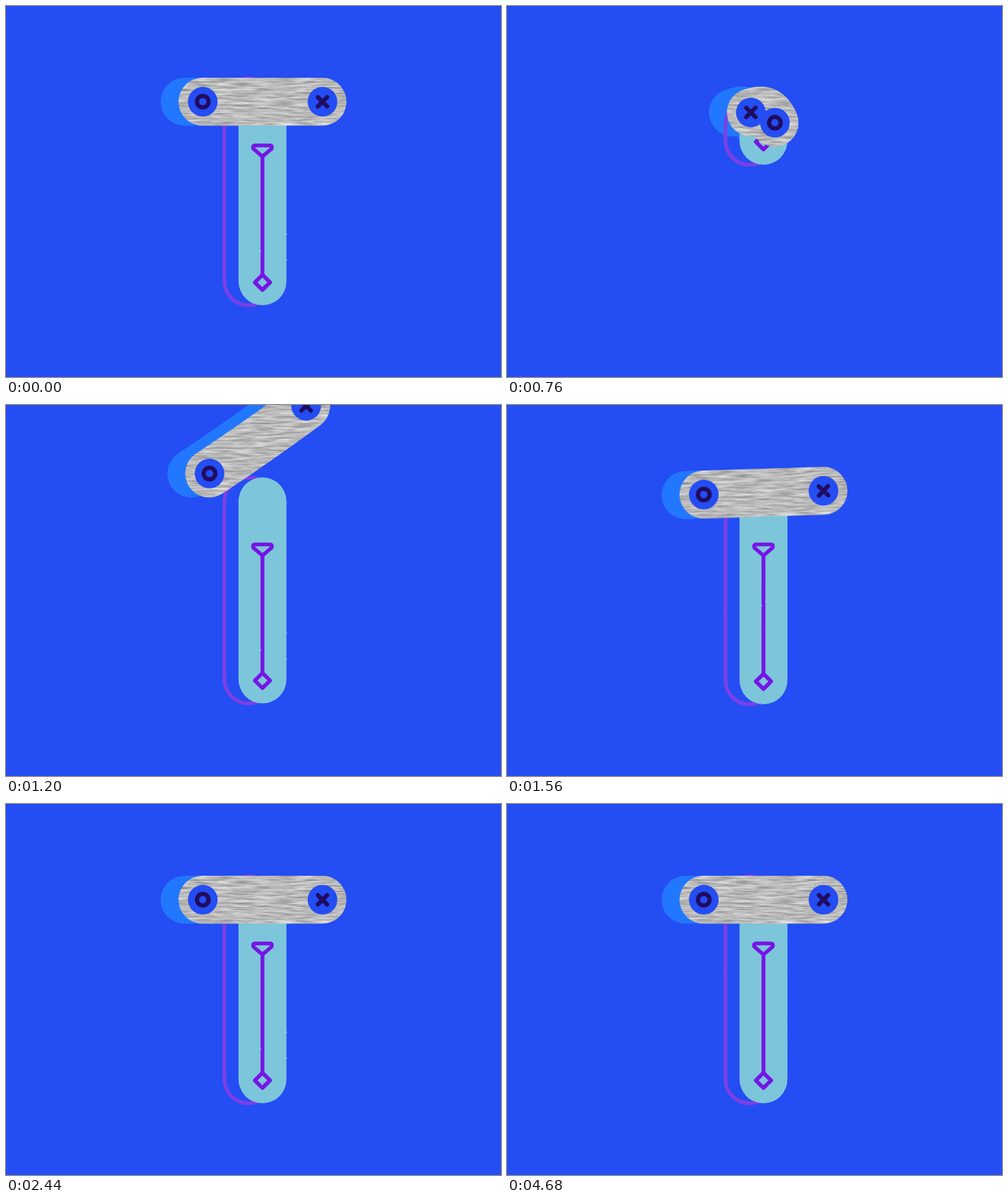
An HTML page without scripts for the animation above (4840 ms loop, 800 px wide and 600 px high).

```html
<!DOCTYPE html>
<html lang="en">
<head>
<meta charset="utf-8">
<title>Letter T</title>
<style>
  @property --top { syntax: "<number>"; inherits: true; initial-value: 117; }
  @property --bottom { syntax: "<number>"; inherits: true; initial-value: 484; }

  :root {
    --loop: 4.84s infinite;
    --wind-up: cubic-bezier(.6, -.28, .74, .05);
    --overshoot: cubic-bezier(.3, 1.3, .6, 1);
  }
  html, body { margin: 0; width: 100%; height: 100%; overflow: hidden; background: #244df3; }
  svg { display: block; width: 100vw; height: 100vh; }

  /* every part of the stem follows its two ends */
  .stem { animation: stem var(--loop) linear; }
  .capsule {
    y: calc(var(--top) * 1px);
    height: calc((var(--bottom) - var(--top)) * 1px);
  }
  .outline { fill: none; stroke: #7b40e6; stroke-width: 6; }
  .column { fill: #7cc5da; }
  .rod { fill: #7615e6; height: max(0px, (var(--bottom) - 294) * 1px); }
  .ink { fill: none; stroke: #7615e6; stroke-width: 6.2; stroke-linejoin: round; }
  .funnel {
    transform-origin: 414.5px 234px;
    transform: scale(clamp(0, (var(--bottom) - 274) / 40, 1));
  }
  .diamond { transform: translate(414.5px, calc((var(--bottom) - 37) * 1px)); }

  .hop {
    transform-origin: 414.5px 155px;
    animation: hop var(--loop) ease-out, vanish var(--loop) step-end;
  }
  .bar {
    fill: none;
    stroke-width: 77.5;
    stroke-linecap: round;
    animation: bar var(--loop) linear;
  }
  .shade { stroke: #2277ff; }
  .wood { stroke: #bdbdbd; filter: url(#wood); }
  .buttons { marker-start: url(#ring); marker-end: url(#cross); }
  .button { fill: #244df3; }
  .mark { fill: none; stroke: #200c60; stroke-width: 6.8; stroke-linecap: round; }

  /* collapse to a disc, then spring back */
  @keyframes stem {
    0%, 4%, 25.6%, 100% { --top: 117; --bottom: 484; animation-timing-function: var(--wind-up); }
    10.7%, 14% { --top: 159.75; --bottom: 237.25; animation-timing-function: ease-in; }
    19%, 19.8% { --top: 118; --bottom: 355; animation-timing-function: var(--overshoot); }
  }

  /* arch, fold away, then a half turn through the air */
  @keyframes bar {
    0%, 4%, 29%, 100% { d: path("M317.5 154.8C382 154.8 447 154.8 511.5 154.8"); animation-timing-function: ease-out; }
    7.5% { d: path("M334 142C362 18 467 18 495 142"); animation-timing-function: ease-in; }
    10.3%, 14.8% { d: path("M414 198C414 198 415 198 415 198"); }
    19%, 19.8% { d: path("M498 156C450 45 385 60 320 80.5"); }
    22.3% { d: path("M397 136C414 72 425 8 431 -55"); }
    25.6% { d: path("M307 103C370 78 440 46 502 19"); animation-timing-function: ease-in; }
  }
  @keyframes vanish {
    10.3% { opacity: 0; }
    0%, 14.8%, 100% { opacity: 1; }
  }

  /* two bounces on landing */
  @keyframes hop {
    0%, 29%, 37.2%, 45.5%, 100% { transform: none; }
    32.2%, 33.8% { transform: translateY(-13px) rotate(-1.8deg); animation-timing-function: ease-in; }
    40.5% { transform: translateY(-11px); animation-timing-function: ease-in-out; }
  }
</style>
</head>
<body>
<svg viewBox="0 0 800 600">
  <defs>
    <filter id="wood" filterUnits="userSpaceOnUse" x="0" y="-20" width="800" height="620" color-interpolation-filters="sRGB">
      <feTurbulence type="fractalNoise" baseFrequency=".03 .32" numOctaves="4" seed="7"/>
      <feColorMatrix values=".5 0 0 0 .48  .5 0 0 0 .48  .5 0 0 0 .48  0 0 0 0 1"/>
      <feComposite in2="SourceAlpha" operator="in"/>
    </filter>
    <!-- hand-cut edges that shift every 320 ms -->
    <filter id="rough" filterUnits="userSpaceOnUse" x="0" y="0" width="800" height="600" color-interpolation-filters="sRGB">
      <feTurbulence type="fractalNoise" baseFrequency=".14" numOctaves="2" seed="1" result="noise">
        <animate attributeName="seed" values="1;2;3;4" calcMode="discrete" dur="1.28s" begin="-1.08s" repeatCount="indefinite"/>
      </feTurbulence>
      <feDisplacementMap in="SourceGraphic" in2="noise" scale="1.6" xChannelSelector="R" yChannelSelector="G"/>
    </filter>
    <marker id="ring" markerUnits="userSpaceOnUse" markerWidth="50" markerHeight="50" refX="24.5" refY="25">
      <circle class="button" cx="25" cy="25" r="24"/>
      <circle class="mark" cx="25" cy="25" r="9.4"/>
    </marker>
    <marker id="cross" markerUnits="userSpaceOnUse" markerWidth="50" markerHeight="50" refX="25" refY="25">
      <circle class="button" cx="25" cy="25" r="24"/>
      <path class="mark" d="M17.5 17.5l15 15m0-15l-15 15"/>
    </marker>
  </defs>

  <rect width="800" height="600" fill="#244df3"/>
  <g class="hop">
    <path class="bar shade" transform="translate(-29)"/>
  </g>
  <g filter="url(#rough)">
    <g class="stem">
      <rect class="capsule outline" x="353" width="78" rx="39"/>
      <rect class="capsule column" x="375.75" width="77.5" rx="38.75"/>
      <rect class="rod" x="411.4" y="245" width="6.2"/>
      <path class="ink funnel" d="M402 225.5H427Q431 226 429 231L414.5 243.5 400 231Q398 226 402 225.5Z"/>
      <path class="ink diamond" d="M0-12.3L12.3 0 0 12.3-12.3 0Z"/>
    </g>
  </g>
  <g class="hop">
    <path class="bar wood"/>
    <path class="bar buttons"/>
  </g>
</svg>
</body>
</html>
```
